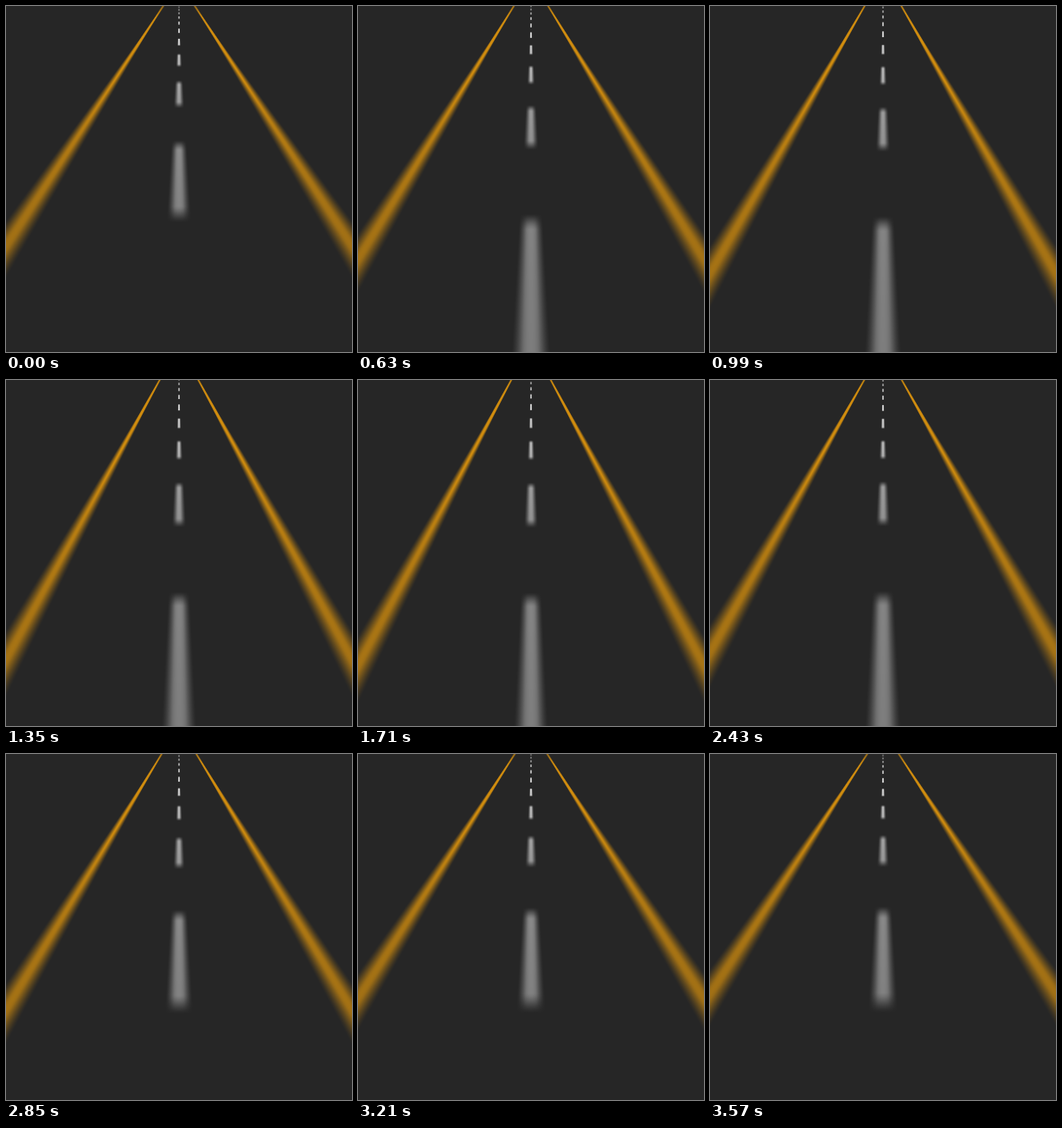
These frames come from a looping animation (400x400 px, 3600 ms). An HTML page with a canvas:

```html
<!DOCTYPE html>
<html lang="en">
<head>
<meta charset="utf-8">
<title>Night road</title>
<style>
  html, body { margin: 0; width: 100%; height: 100%; overflow: hidden; background: #262626; }
  canvas { display: block; width: 400px; height: 400px; }
</style>
</head>
<body>
<canvas id="road" width="400" height="400"></canvas>
<script>
const SIZE = 400, LOOP = 3600, STEP = 30;
const ASPHALT = [38, 38, 38], ORANGE = [208, 140, 14], WHITE = [208, 208, 208];
const SIDE = 1.006, SIDE_HALF = 0.042, DASH_HALF = 0.025;
const DASH_SCALE = 197, DASH_LENGTH = 0.475;
const BLUR = 0.07, FOCUS = 35;

const ctx = document.getElementById('road').getContext('2d');
const image = ctx.createImageData(SIZE, SIZE);
const px = image.data;

// Share of a lens disc lying on one side of an edge
function edge(u) {
  if (u <= -1) return 0;
  if (u >= 1) return 1;
  return 0.5 + (u * Math.sqrt(1 - u * u) + Math.asin(u)) / Math.PI;
}

const band = (d, half, r) => edge((d + half) / r) - edge((d - half) / r);

function dashCover(y, r, phase, height, horizon) {
  let sum = 0;
  const rowOf = q => q > 0 ? height * DASH_SCALE / q - horizon : Infinity;
  for (let n = 0; n < 14; n++) {
    const far = rowOf(n + phase), near = rowOf(n + phase - DASH_LENGTH);
    sum += edge((y - far) / r) - edge((y - near) / r);
  }
  return sum;
}

function draw(frame) {
  const sway = Math.cos(2 * Math.PI * (frame * STEP + 25) / LOOP);
  const height = 1.705 - 0.17 * sway;
  const horizon = 35.2 - 7.4 * sway;
  const phase = (0.675 - 0.072 * sway + frame / 6) % 1;
  const slant = Math.hypot(1, 1 / height);

  for (let row = 0; row < SIZE; row++) {
    const y = row + 0.5;
    const scale = (y + horizon) / height;
    const r = Math.max(0.6, BLUR * Math.abs(scale - FOCUS));
    const dash = dashCover(y, r, phase, height, horizon);
    for (let col = 0; col < SIZE; col++) {
      const x = Math.abs(col + 0.5 - SIZE / 2);
      const side = band(x - SIDE * scale, SIDE_HALF * scale, r * slant);
      const mid = dash * band(x, DASH_HALF * scale, r);
      const i = (row * SIZE + col) * 4;
      for (let c = 0; c < 3; c++) {
        px[i + c] = ASPHALT[c] + side * (ORANGE[c] - ASPHALT[c]) + mid * (WHITE[c] - ASPHALT[c]);
      }
      px[i + 3] = 255;
    }
  }
  ctx.putImageData(image, 0, 0);
}

let shown = -1;
function tick() {
  const frame = Math.floor((performance.now() % LOOP + 1) / STEP) % (LOOP / STEP);
  if (frame !== shown) draw(shown = frame);
  requestAnimationFrame(tick);
}
tick();
</script>
</body>
</html>
```
